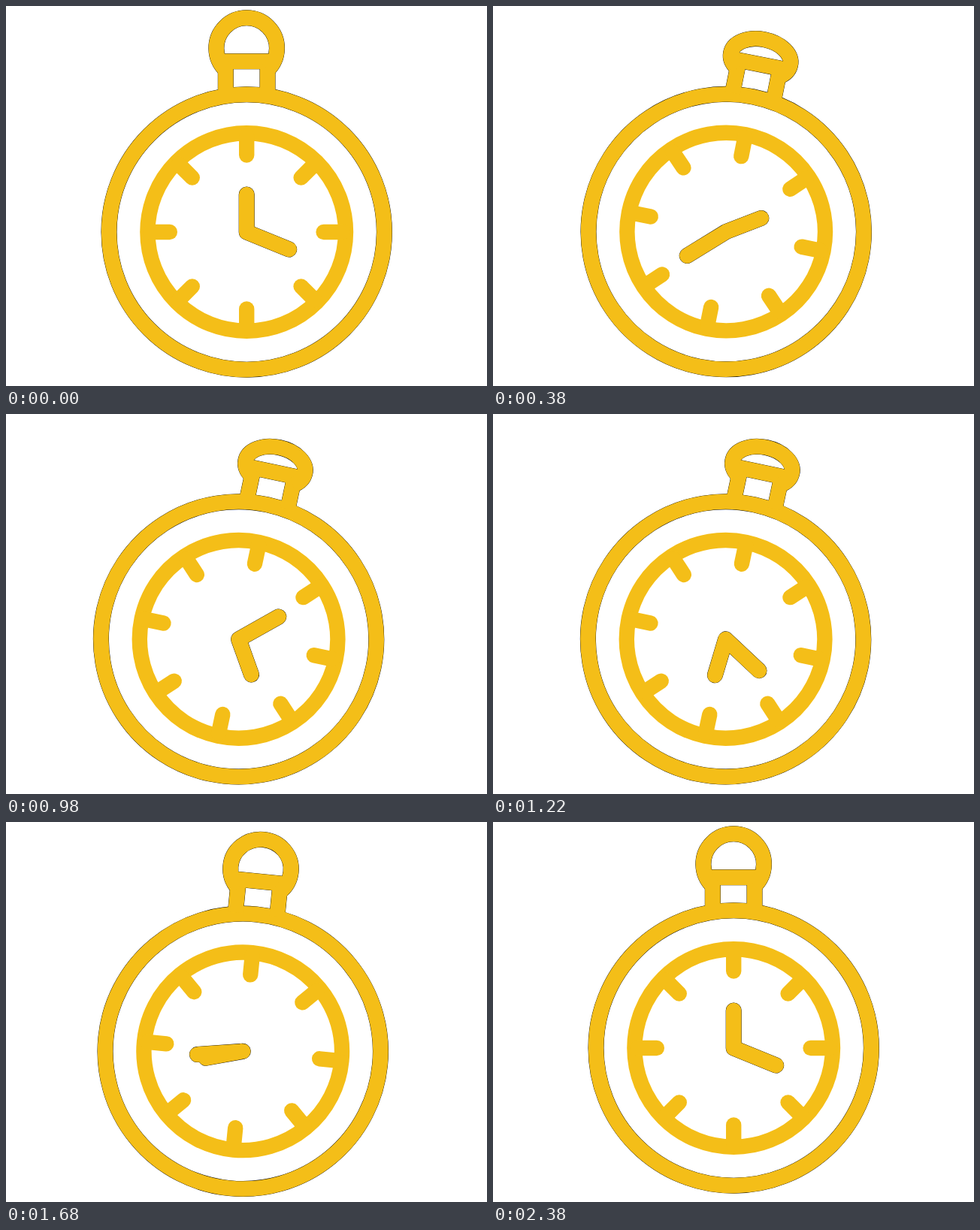
Animation, 640 px wide and 506 px high, one loop 2.4 s. Source, as an HTML page:

```html
<!DOCTYPE html>
<html lang="en">
<head>
<meta charset="utf-8">
<title>Stopwatch</title>
<style>
  html, body { margin: 0; width: 100%; height: 100%; overflow: hidden; background: #fff; }
  svg { display: block; width: 100vw; height: 100vh; }
  .ink { fill: none; stroke: #f4be18; stroke-width: 20.4; stroke-linejoin: round; }
  .edge { fill: none; stroke: #000; stroke-width: 21; stroke-linejoin: round; }
  .round { stroke-linecap: round; }
</style>
</head>
<body>
<svg viewBox="0 0 640 506">
  <defs>
    <g id="shell">
      <circle cx="320.2" cy="301" r="183.2"/>
      <path d="M292.3 118V73.7H348V118"/>
      <path id="knob"/>
    </g>
    <path id="hands"/>
  </defs>
  <g id="watch">
    <use href="#shell" class="edge"/>
    <use href="#shell" class="ink"/>
    <circle class="ink" cx="320.2" cy="301" r="131.8"/>
    <g id="ticks" class="ink round"></g>
    <use href="#hands" class="edge round"/>
    <use href="#hands" class="ink round"/>
  </g>
</svg>
<script>
const LOOP = 2400, STEP = 20, SPIN = LOOP - STEP;
const CX = 320.2, CY = 301, PIVOT = 250;
const $ = id => document.getElementById(id);

// Keys are [time, value] pairs
const TILT = [[40, 0], [230, 6], [440, 12.6], [560, 12], [1480, 12], [1520, 12.6], [1650, 6], [1840, 0]];
const DIP = [[40, 0], [230, 4.9], [420, 0], [1490, 0], [1650, 4.9], [1840, 0]];
const PRESS = [[160, 0], [320, 1], [1550, 1], [1708, 0]];

const smooth = u => u * u * (3 - 2 * u);

function at(keys, t) {
  if (t <= keys[0][0]) return keys[0][1];
  for (let i = 1; i < keys.length; i++) {
    const [t0, a] = keys[i - 1], [t1, b] = keys[i];
    if (t < t1) return a + (b - a) * smooth((t - t0) / (t1 - t0));
  }
  return keys[keys.length - 1][1];
}

// Point on the dial, angle clockwise from twelve
function polar(deg, r) {
  const a = deg * Math.PI / 180;
  return (CX + r * Math.sin(a)).toFixed(2) + " " + (CY - r * Math.cos(a)).toFixed(2);
}

let marks = "";
for (let a = 0; a < 360; a += 45) marks += `<path d="M${polar(a, 128)}L${polar(a, 102.4)}"/>`;
$("ticks").innerHTML = marks;

function draw(t) {
  const turn = 360 * t / SPIN;
  const ry = 40.3 - 14.1 * at(PRESS, t);
  $("knob").setAttribute("d", `M292.3 85.2A40.3 ${ry} 0 1 1 348 85.2`);
  $("hands").setAttribute("d", `M${polar(turn, 50)}L${CX} ${CY}L${polar(112.2 + 2 * turn, 61)}`);
  $("watch").setAttribute("transform",
    `translate(0 ${at(DIP, t)}) rotate(${at(TILT, t)} ${CX} ${PIVOT})`);
}

let start;
function tick(now) {
  if (start === undefined) start = now;
  const t = (now - start) % LOOP;
  draw(Math.floor(t / STEP) * STEP);
  requestAnimationFrame(tick);
}
draw(0);
requestAnimationFrame(tick);
</script>
</body>
</html>
```
